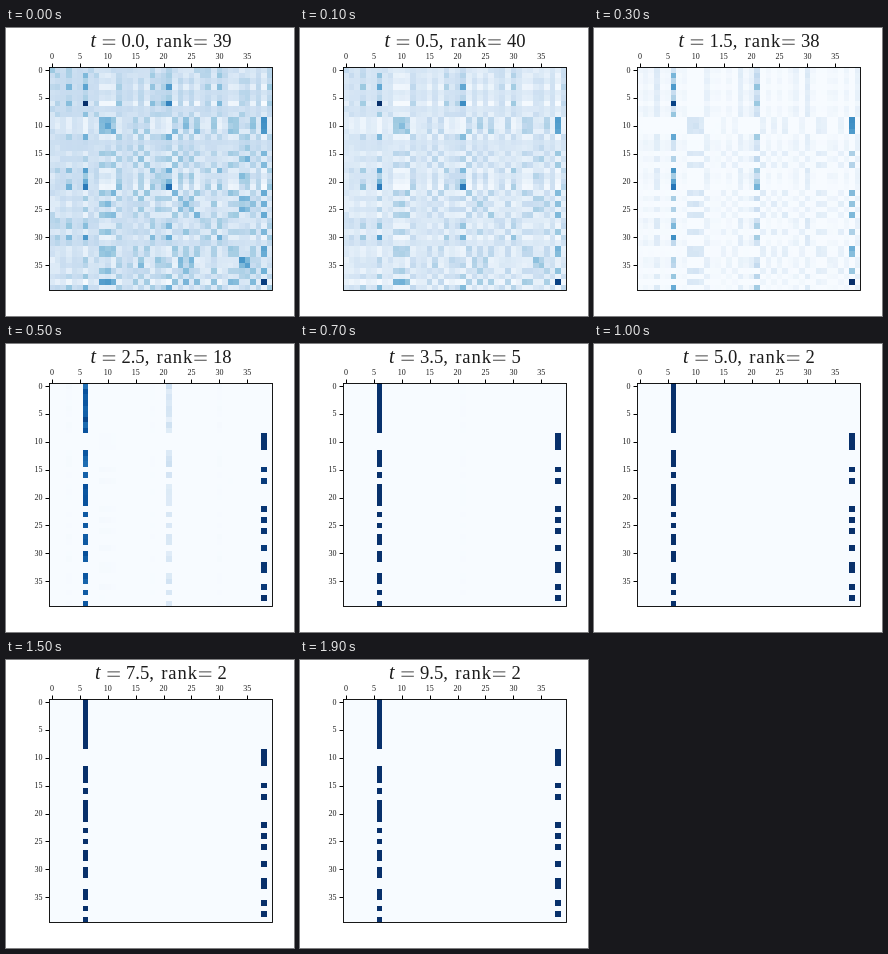
These frames come from a looping animation (288x288 px, 2 s). An HTML page with a canvas:

```html
<!DOCTYPE html>
<html lang="en">
<head>
<meta charset="utf-8">
<title>Self-attention matrix over time</title>
<style>
html, body { margin: 0; width: 100%; height: 100%; overflow: hidden; background: #fff; }
canvas { display: block; width: 288px; height: 288px; }
</style>
</head>
<body>
<canvas id="stage" width="288" height="288"></canvas>
<script>
const ctx = document.getElementById('stage').getContext('2d');
const N = 40, FRAMES = 20, FRAME_MS = 100, STEP = 0.02, STEPS_PER_FRAME = 25;
const LEFT = 43.2, TOP = 39.2, CELL = 5.58;
const SERIF = '"Liberation Serif", serif';
const INK = '#1c1c1c';

// Starting positions of the tokens along the growing direction
const START = [
  0.15, 0.48, 0.25, 0.82, 0.15, 0.3, 1.25, 0.1, 0.32, -0.8,
  -0.8, -0.74, 0.63, 0.08, 0.1, -0.5, 0.3, -0.48, 0.76, 0.28,
  0.63, 1.11, -0.6, 0.3, -0.6, 0.25, -0.62, 0.25, 0.56, -0.52,
  0.82, 0.2, -0.65, -0.6, 0.2, 0.25, -0.58, 0.4, -1.2, 0.64
];
// Tokens that stand out along the constant directions
const LIKE = { 16: 0.7, 19: 0.6, 23: 0.8, 24: 0.6, 25: 0.8, 34: 1, 35: 0.9, 36: 0.5 };
const RANKS = [39, 40, 40, 38, 29, 18, 9, 5, 3];

const BLUES = ['f7fbff', 'deebf7', 'c6dbef', '9ecae1', '6baed6', '4292c6', '2171b5', '08519c', '08306b']
  .map(hex => [0, 2, 4].map(i => parseInt(hex.slice(i, i + 2), 16)));

let seed = 7;
function spread(size) {
  seed = (seed * 16807) % 2147483647;
  return size * (2 * seed / 2147483647 - 1);
}

const fixed = START.map((_, i) => [LIKE[i] ?? spread(0.45), spread(0.5)]);
const similarity = fixed.map(a => fixed.map(b => a[0] * b[0] + a[1] * b[1]));

function blue(v) {
  const pos = v * (BLUES.length - 1);
  const i = Math.min(Math.floor(pos), BLUES.length - 2);
  const rgb = BLUES[i].map((c, k) => Math.round(c + (BLUES[i + 1][k] - c) * (pos - i)));
  return `rgb(${rgb})`;
}

// Row-wise softmax of the token products
function attention(z, t) {
  const gain = Math.exp(2 * t);
  return z.map((a, i) => {
    const logits = z.map((b, j) => gain * a * b + similarity[i][j]);
    const top = Math.max(...logits);
    const row = logits.map(l => Math.exp(l - top));
    const sum = row.reduce((s, v) => s + v, 0);
    return row.map(v => v / sum);
  });
}

function simulate() {
  const out = [];
  let z = START;
  for (let k = 0; k < FRAMES * STEPS_PER_FRAME; k++) {
    const p = attention(z, k * STEP);
    if (k % STEPS_PER_FRAME === 0) out.push(p);
    z = z.map((a, i) => a + STEP * p[i].reduce((s, w, j) => s + w * (z[j] - a), 0));
  }
  return out;
}

const matrices = simulate();

function text(str, x, y, size, align = 'left', style = '') {
  ctx.font = `${style} ${size}px ${SERIF}`;
  ctx.textAlign = align;
  ctx.fillText(str, x, y);
}

function equals(x) {
  ctx.fillRect(x + 1, 11.5, 12.4, 0.8);
  ctx.fillRect(x + 1, 15.8, 12.4, 0.8);
}

function drawTitle(frame) {
  const rank = String(RANKS[frame] ?? 2);
  const size = 18.6;
  const x = 154.7 - (123 + rank.length * size / 2) / 2;
  ctx.fillStyle = INK;
  text('t', x + 0.5, 18.8, 20, 'left', 'italic');
  equals(x + 11.9);
  text((frame / 2).toFixed(1) + ',', x + 31.5, 18.8, size);
  ctx.letterSpacing = '0.9px';
  text('rank', x + 66.7, 18.8, size);
  ctx.letterSpacing = '0px';
  equals(x + 103.4);
  text(rank, x + 123, 18.8, size);
}

function drawMatrix(p) {
  const values = p.flat();
  const low = Math.min(...values), high = Math.max(...values);
  const edge = (origin, i) => Math.round(origin + i * CELL);
  for (let i = 0; i < N; i++) {
    const y = edge(TOP, i), h = edge(TOP, i + 1) - y;
    for (let j = 0; j < N; j++) {
      const x = edge(LEFT, j);
      ctx.fillStyle = blue((p[i][j] - low) / (high - low));
      ctx.fillRect(x, y, edge(LEFT, j + 1) - x, h);
    }
  }
}

function drawAxes() {
  ctx.strokeStyle = '#000';
  ctx.lineWidth = 0.9;
  ctx.strokeRect(43.5, 39.5, 223, 223);
  for (let n = 0; n < N; n += 5) {
    const x = LEFT + (n + 0.5) * CELL, y = TOP + (n + 0.5) * CELL;
    ctx.fillStyle = '#000';
    ctx.fillRect(Math.round(x), 35.5, 1, 3.5);
    ctx.fillRect(39.5, Math.round(y), 3.5, 1);
    ctx.fillStyle = INK;
    text(n, x, 30.6, 8, 'center');
    text(n, 36.4, y + 2.6, 8, 'right');
  }
}

let shown = -1;
function tick() {
  const frame = Math.floor(performance.now() / FRAME_MS) % FRAMES;
  if (frame !== shown) {
    shown = frame;
    ctx.fillStyle = '#fff';
    ctx.fillRect(0, 0, 288, 288);
    drawMatrix(matrices[frame]);
    drawAxes();
    drawTitle(frame);
  }
  requestAnimationFrame(tick);
}
tick();
</script>
</body>
</html>
```
